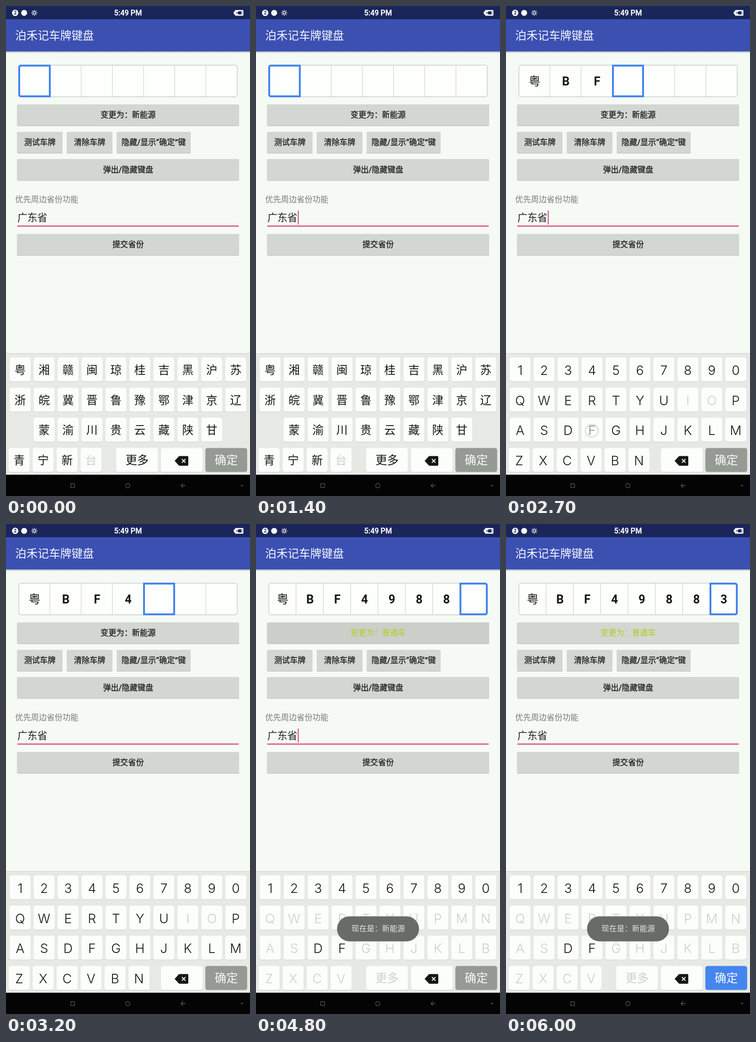
Animation, 518 px wide and 1036 px high, one loop 6.1 s. Source, as an HTML page:

```html
<!DOCTYPE html>
<html lang="zh-CN">
<head>
<meta charset="utf-8">
<title>车牌键盘</title>
<style>
html, body { margin: 0; width: 100%; height: 100%; overflow: hidden; background: #f6faf5; }
svg { display: block; width: 100vw; height: 100vh; }
text { font-family: Roboto, "Noto Sans CJK SC", "Noto Sans CJK", sans-serif; }
.key { font-family: Inter, "Noto Sans CJK SC", "Noto Sans CJK", sans-serif; }
.latin { font-weight: 300; }
.medium { font-weight: 500; stroke: currentColor; stroke-width: .35; }
</style>
</head>
<body>
<svg id="stage" viewBox="0 0 518 1036" xmlns="http://www.w3.org/2000/svg">
  <defs>
    <linearGradient id="shade" x2="0" y2="1">
      <stop stop-color="#8d95a8" stop-opacity=".7"/>
      <stop offset="1" stop-color="#8d95a8" stop-opacity="0"/>
    </linearGradient>
  </defs>
  <g id="fixed"></g>
  <g id="live"></g>
</svg>
<script>
const LOOP = 6100;
const INK = '#151715', PALE = '#cdd0cc', BLUE = '#4585ee';
const ROW_Y = [743, 807, 870.5, 934.5];
const PITCH = 50.85;

// Time and plate slot value of each key press, with the finger position.
const PRESSES = [
  { at: 1700, char: '粤', x: 30, y: 768 },
  { at: 2100, char: 'B', x: 229, y: 964 },
  { at: 2500, char: 'F', x: 182, y: 898 },
  { at: 2850, char: '4', x: 183, y: 769 },
  { at: 3350, char: '9', x: 437, y: 769 },
  { at: 3650, char: '8', x: 386, y: 768 },
  { at: 3900, char: '8', x: 385, y: 767 },
  { at: 4400, x: 262, y: 231 },
  { at: 5500, char: '3', x: 132, y: 769 }
];
const SWITCH_AT = 4400, TOUCH_MS = 250;

const LAYOUTS = {
  province: ['粤湘赣闽琼桂吉黑沪苏', '浙皖冀晋鲁豫鄂津京辽', ' 蒙渝川贵云藏陕甘', '青宁新台'],
  full: ['1234567890', 'QWERTYUIOP', 'ASDFGHJKLM', 'ZXCVBN'],
  tail: ['1234567890', 'QWERTYUPMN', 'ASDFGHJKLB', 'ZXCV']
};

const rect = (x, y, w, h, fill, rx = 0, more = '') =>
  `<rect x="${x}" y="${y}" width="${w}" height="${h}" rx="${rx}" fill="${fill}" ${more}/>`;
const text = (s, x, y, size, fill, more = '') =>
  `<text x="${x}" y="${y}" font-size="${size}" fill="${fill}" color="${fill}" ${more}>${s}</text>`;
const path = (d, more) => `<path d="${d}" ${more}/>`;
const circle = (x, y, r, more) => `<circle cx="${x}" cy="${y}" r="${r}" ${more}/>`;
const MIDDLE = 'text-anchor="middle"';

function button(x, y, w, label, fill = '#d3d7d2', ink = '#202320') {
  return rect(x, y + 1, w, 45, '#c6cac5', 2) + rect(x, y, w, 44.5, fill, 2) +
    text(label, x + w / 2, y + 28.3, 16.7, ink, MIDDLE + ' class="medium"');
}

function statusBar() {
  const rays = [...Array(8).keys()].map(i =>
    `<path d="M60 8.2v2" transform="rotate(${i * 45} 60 14.5)" stroke="#fff" stroke-width="1.5"/>`).join('');
  return rect(0, 0, 518, 28, '#1a2659') +
    circle(19.5, 14.5, 6.7, 'fill="#fff"') +
    text('2', 19.5, 18.2, 10, '#1a2659', MIDDLE + ' font-weight="700"') +
    circle(38.5, 14.5, 6.3, 'fill="#fff"') +
    circle(60, 14.5, 2.8, 'fill="none" stroke="#fff" stroke-width="1.4"') + rays +
    text('5:49 PM', 259, 20, 15.8, '#fff', MIDDLE + ' class="medium"') +
    rect(486, 8.5, 18, 12, '#fff', 1.5) + rect(483.5, 11.5, 4, 6, '#fff', 1) +
    path('M488 14.5h4M499 12.8h3M499 16.2h3', 'stroke="#1a2659" stroke-width="1.4"') +
    path('M499 11h-3.5a3.5 3.5 0 0 0 0 7h3.5z', 'fill="#1a2659"');
}

function navBar() {
  const line = 'fill="none" stroke="#555855" stroke-width="1.3"';
  return rect(0, 991, 518, 45, '#030403') +
    rect(137.5, 1010, 8, 8, 'none', 0, 'stroke="#555855" stroke-width="1.3"') +
    circle(258.5, 1014, 4.5, line) +
    path('M381 1014h-9.5M376 1009.5l-4.5 4.5l4.5 4.5', line) +
    path('M498.5 1012.5l2.5 2.5l2.5-2.5', line);
}

function fixedParts() {
  return rect(0, 0, 518, 1036, '#f6faf5') +
    rect(0, 96, 518, 4, 'url(#shade)') + rect(0, 28, 518, 68, '#3c50b2') +
    statusBar() +
    text('泊禾记车牌键盘', 19.5, 71, 23.9, '#f4f7fb') +
    button(23.5, 266, 96.5, '测试车牌') +
    button(129, 266, 97, '清除车牌') +
    button(235, 266, 157, '隐藏/显示“确定”键') +
    button(23.5, 323.5, 471.5, '弹出/隐藏键盘') +
    text('优先周边省份功能', 19.5, 415.3, 16.75, '#777b77') +
    text('广东省', 24.2, 455, 21.2, '#202320') +
    rect(24, 464, 470, 2.6, '#de5583') +
    button(23.5, 482, 471.5, '提交省份') +
    rect(0, 734, 518, 257, '#e6e9e4') + rect(0, 734, 518, 1.2, '#cfd3ce') +
    navBar();
}

function plate(chars, count) {
  const left = 27.3, top = 125, w = 463.6 / count, h = 67;
  const active = Math.min(chars.length, count - 1);
  let out = rect(left, top, 463.6, h, '#fdfffd', 5, 'stroke="#d5d9d5" stroke-width="2"');
  for (let i = 1; i < count; i++) out += rect(left + w * i - 1, top, 1.6, h, '#d9ddd9');
  chars.forEach((c, i) => {
    out += text(c, left + w * (i + .5) + .4, 168, 25, INK, `${MIDDLE} font-weight="${i ? 600 : 400}"`);
  });
  const x = Math.round(left + w * active) + 1, r = Math.round(left + w * (active + 1)) - 1;
  const t = top + 1, b = top + h - 1;
  const rl = active === 0 ? 4 : 0, rr = active === count - 1 ? 4 : 0;
  return out + path(
    `M${x + rl} ${t}H${r - rr}q${rr} 0 ${rr} ${rr}V${b - rr}q0 ${rr} ${-rr} ${rr}` +
    `H${x + rl}q${-rl} 0 ${-rl} ${-rl}V${t + rl}q0 ${-rl} ${rl} ${-rl}z`,
    `fill="none" stroke="${BLUE}" stroke-width="4"`);
}

function key(x, y, w, label, ink = INK, fill = '#fcfefb') {
  const latin = /^\w$/.test(label);
  const size = latin ? 27.5 : label.length > 1 ? 24.6 : 24;
  return rect(x, y + 1.2, w, 50.5, '#d3d7d2', 4.5) + rect(x, y, w, 50.5, fill, 4.5) +
    text(label, x + w / 2, y + (latin ? 36.8 : 34.8), size, ink, `${MIDDLE} class="key${latin ? ' latin' : ''}"`);
}

function keyboard(typed, newEnergy) {
  const slots = newEnergy ? 8 : 7;
  const last = typed >= slots - 1;
  const name = !typed ? 'province' : last ? 'tail' : 'full';
  const disabled = c =>
    name === 'province' ? c === '台' :
    newEnergy ? !/[0-9DF]/.test(c) :
    typed === 1 ? /[0-9I]/.test(c) : name === 'full' && /[IO]/.test(c);
  let out = '';
  LAYOUTS[name].forEach((row, r) => [...row].forEach((c, i) => {
    if (c !== ' ') out += key((r === 3 ? 5.8 : 7.8) + PITCH * i, ROW_Y[r], 44.5, c, disabled(c) ? PALE : INK);
  }));
  if (name !== 'full') out += key(234, ROW_Y[3], 88.5, '更多', newEnergy ? PALE : INK);
  return out + key(329, ROW_Y[3], 88.5, '') +
    path('M358 961.7L366.5 952.5Q367.5 951.5 369 951.5H385Q387 951.5 387 953.5V970Q387 972 385 972H369Q367.5 972 366.5 971z', `fill="${INK}"`) +
    path('M373.5 958l7.5 7.5m0-7.5l-7.5 7.5', 'stroke="#fff" stroke-width="1.8"') +
    key(423.3, ROW_Y[3], 88.7, '确定', '#f7faf6', typed === slots ? BLUE : '#959a94');
}

function toast(opacity) {
  return `<g opacity="${opacity}">` + rect(172, 829.5, 174, 53, '#676c66', 26.5) +
    text('现在是：新能源', 259.5, 860.5, 16.2, '#e3e6e2', MIDDLE) + '</g>';
}

function scene(t) {
  const chars = PRESSES.filter(p => p.char && t >= p.at).map(p => p.char);
  const newEnergy = t >= SWITCH_AT;
  const touch = PRESSES.find(p => t >= p.at && t < p.at + TOUCH_MS);
  const blink = t % 1000;
  let out = plate(chars, newEnergy ? 8 : 7) + (newEnergy
    ? button(23.5, 208, 471.5, '变更为：普通车', t < 5000 ? '#cbcfca' : '#d3d7d2', '#b6ce46')
    : button(23.5, 208, 471.5, '变更为：新能源'));
  if (blink >= 350 && blink < 850) out += rect(88.6, 432.5, 2.2, 29.5, '#d65590');
  out += keyboard(chars.length, newEnergy);
  if (newEnergy) out += toast(Math.min(1, (t - SWITCH_AT) / 250).toFixed(2));
  if (touch) out += circle(touch.x, touch.y, 13.5, 'fill="#fff" fill-opacity=".5" stroke="#b4b8b3" stroke-opacity=".75" stroke-width="1.4"');
  return out;
}

const live = document.getElementById('live');
document.getElementById('fixed').innerHTML = fixedParts();
const start = performance.now();
let shown = '';

function draw() {
  const next = scene(Math.max(0, performance.now() - start) % LOOP);
  if (next !== shown) live.innerHTML = shown = next;
  requestAnimationFrame(draw);
}
draw();
</script>
</body>
</html>
```
